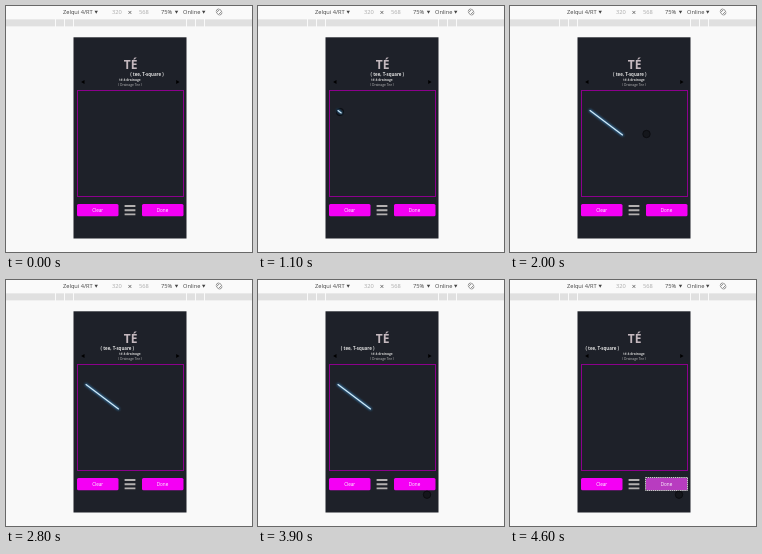
Recreate the animation shown at these times as an HTML page. Size 246 px wide and 246 px high, loop 4.7 s.

```html
<!DOCTYPE html>
<html lang="en">
<head>
<meta charset="utf-8">
<style>
html, body { margin: 0; width: 100%; height: 100%; overflow: hidden; background: #f9f9f9; }
svg { display: block; width: 100%; height: 100%; }
text { font-family: "Open Sans", "Noto Sans", sans-serif; }
.mid { text-anchor: middle; }
.bar { font-size: 5.7px; fill: #444; }
.dim { fill: #aaa; }
.btn { font-size: 4.6px; fill: #fff; }
</style>
</head>
<body>
<svg viewBox="0 0 246 246">
  <defs>
    <filter id="glow" filterUnits="userSpaceOnUse" x="68" y="90" width="60" height="54">
      <feGaussianBlur stdDeviation="1.2"/>
    </filter>
  </defs>

  <rect width="246" height="13" fill="#fafafa"/>
  <rect y="13.4" width="246" height="7" fill="#e0e0e0"/>
  <path d="M49.5 13v8M58.5 13v8M67.5 13v8M180.5 13v8M189.5 13v8M198.5 13v8" stroke="#fafafa"/>
  <g class="bar">
    <text x="57" y="8.3">Zelqui 4/RT</text>
    <text class="dim" x="106" y="8.3">320</text>
    <text class="mid" x="124" y="9" font-size="7.5">×</text>
    <text class="dim" x="133" y="8.3">568</text>
    <text x="155" y="8.3">75%</text>
    <text x="177" y="8.3">Online</text>
    <path d="M88.5 4.7h3.4l-1.7 3zM168.8 4.7h3.4l-1.7 3zM196 4.7h3.4l-1.7 3z"/>
  </g>
  <g fill="none" stroke="#666" stroke-width=".7">
    <rect x="211.7" y="3.6" width="2.8" height="4.8" transform="rotate(45 213.1 6)"/>
    <path d="M210.1 5.5a3.2 3.2 0 0 1 2.7-2.7M216.1 6.5a3.2 3.2 0 0 1-2.7 2.7"/>
  </g>

  <rect x="67.5" y="31.3" width="113" height="201.2" fill="#1e2129"/>
  <text class="mid" x="124.6" y="62.5" font-size="12" font-weight="700" fill="#c4b8be">TÉ</text>
  <text id="marquee" y="69.8" font-size="4.4" font-weight="700" fill="#ddd">( tee, T-square )</text>
  <text class="mid" x="124" y="75" font-size="3.3" font-weight="700" fill="#ccc">té à drainage</text>
  <text class="mid" x="124" y="79.6" font-size="3.3" fill="#bbb">( Drainage Tee )</text>
  <path d="M78.5 74v4l-3.4-2zM170.2 74v4l3.4-2z" fill="#000"/>
  <rect x="71.5" y="84.5" width="106" height="106" fill="none" stroke="#8c008c"/>

  <rect x="71" y="198" width="41.5" height="12.2" rx="1.5" fill="#f400f4"/>
  <rect id="done" x="136" y="198" width="41.5" height="12.2" rx="1.5"/>
  <rect id="focus" x="135.5" y="197.5" width="42" height="13" fill="none" stroke="#c8c8c8" stroke-dasharray="1.5 .6"/>
  <text class="btn mid" x="91.7" y="205.8">Clear</text>
  <text class="btn mid" x="156.5" y="205.8">Done</text>
  <path d="M118.6 200h10.8M118.6 204.2h10.8M118.6 208.4h10.8" stroke="#b3b0b0" stroke-width="1.9"/>

  <circle id="pointer" r="3.7" fill="#14161b" stroke="#090a0d" stroke-width=".8"/>
  <g id="stroke" fill="none" stroke-linecap="round">
    <path stroke="#3579ad" stroke-width="2.2" filter="url(#glow)"/>
    <path stroke="#d3ebf8" stroke-width="1.1"/>
  </g>
</svg>
<script>
const LOOP = 4700, STEP = 100;
const $ = id => document.getElementById(id);
const lines = document.querySelectorAll('#stroke path');
const show = (el, on) => el.setAttribute('visibility', on ? 'visible' : 'hidden');

// Pointer keys: time, x, y
const keys = [
  [200, 92, 188], [600, 82, 106], [1200, 82, 106], [1600, 112.5, 129],
  [1800, 138, 127.5], [2000, 136.5, 128], [2400, 153, 186], [2500, 169, 214.7], [LOOP, 169, 214.7]
];

function pointerAt(t) {
  const i = Math.max(1, keys.findIndex(k => k[0] >= t));
  const [t0, x0, y0] = keys[i - 1], [t1, x1, y1] = keys[i];
  const p = Math.max(0, (t - t0) / (t1 - t0));
  return [x0 + (x1 - x0) * p, y0 + (y1 - y0) * p];
}

function draw(t) {
  $('marquee').setAttribute('x', 124.2 - 0.0106 * t);

  const [x, y] = pointerAt(t);
  $('pointer').setAttribute('cx', x);
  $('pointer').setAttribute('cy', y);
  show($('pointer'), t >= 200 && (t < 2700 || t >= 3200));

  const p = 0.1 + 0.9 * Math.min(1, Math.max(0, (t - 1200) / 400));
  lines.forEach(l => l.setAttribute('d', `M80 104.5l${32.5 * p} ${24.5 * p}`));
  show($('stroke'), t >= 600 && t < 4500);

  const pressed = t >= 4500;
  $('done').setAttribute('fill', pressed ? '#b83cc0' : '#f400f4');
  show($('focus'), pressed);
}

function tick() {
  draw(Math.floor(performance.now() % LOOP / STEP) * STEP);
  requestAnimationFrame(tick);
}
tick();
</script>
</body>
</html>
```
